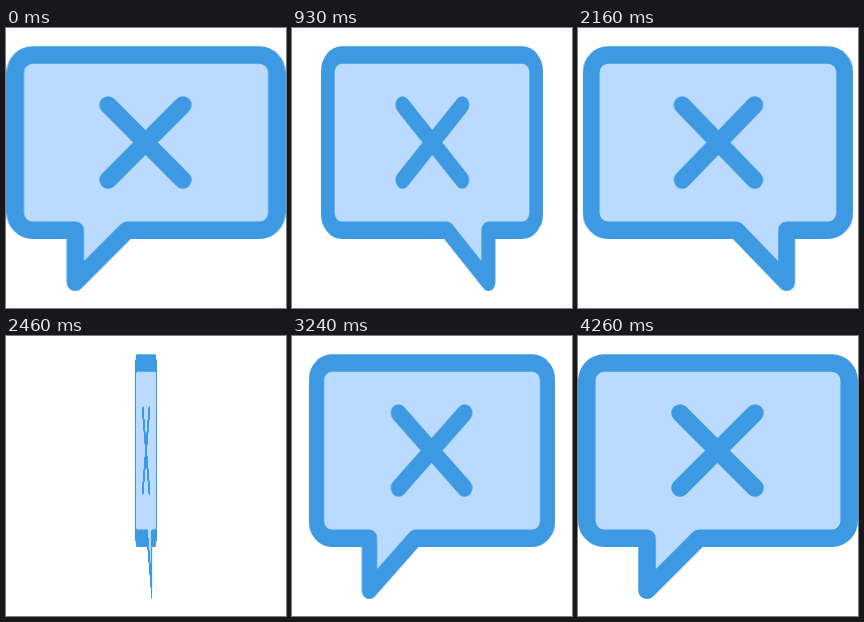
These frames come from a looping animation (280x280 px, 4320 ms). An HTML page without scripts:

```html
<!DOCTYPE html>
<html lang="en">
<head>
<meta charset="utf-8">
<title>Flipping speech bubble</title>
<style>
  html, body { margin: 0; width: 100%; height: 100%; overflow: hidden; background: #fff; }
  svg {
    display: block;
    width: 100%;
    height: 100%;
    fill: none;
    stroke: #3d9ae2;
    stroke-width: 17.5;
    stroke-linecap: round;
    stroke-linejoin: round;
    animation: flip 4320ms cubic-bezier(0, .5, .5, 1) infinite;
  }
  .bubble { fill: #bbdaff; }
  /* two half turns, each fast at first and settling slowly */
  @keyframes flip {
    0% { transform: rotateY(0deg); }
    49.8% { transform: rotateY(180deg); }
    99.7%, 100% { transform: rotateY(360deg); }
  }
</style>
</head>
<body>
<svg viewBox="0 0 280 280">
  <path class="bubble" d="M26.3 27H253.7a17.5 17.5 0 0 1 17.5 17.5V184.7a17.5 17.5 0 0 1-17.5 17.5H121L69 254.2V202.2H26.3a17.5 17.5 0 0 1-17.5-17.5V44.5A17.5 17.5 0 0 1 26.3 27Z"/>
  <path d="M102 77L177 152M177 77L102 152"/>
</svg>
</body>
</html>
```
